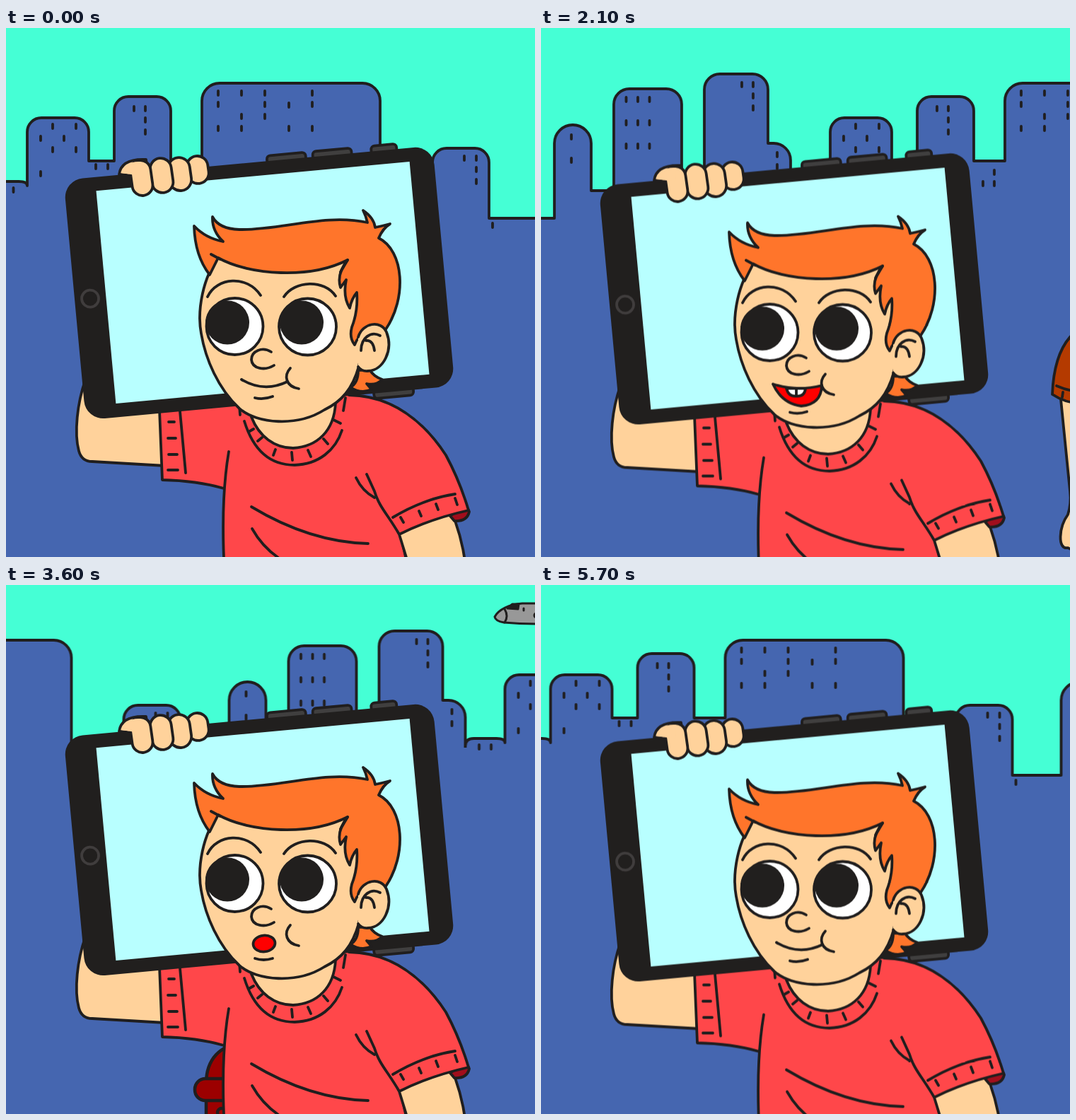
Animation, 748 px wide and 748 px high, one loop 5.8 s. Source, as an HTML page without scripts:

```html
<!DOCTYPE html>
<html lang="en">
<head>
<meta charset="utf-8">
<title>City walk</title>
<style>
html, body { margin: 0; width: 100%; height: 100%; overflow: hidden; background: #45ffd5; }
svg { display: block; width: 100vw; height: 100vh; }
path, rect, circle, ellipse { stroke: #201e1e; stroke-width: 3.8; stroke-linejoin: round; stroke-linecap: round; }
.line { fill: none; }
.flat { stroke: none; }
.ink { fill: #211f1e; }
.skin { fill: #ffd29b; }
.blue { fill: #4566b0; }
.red { fill: #ff474a; }
.hair { fill: #ff752b; }
.key { fill: #403f3f; }
.rust { fill: #b43a00; }
.pants { fill: #7d2a00; }
.blond { fill: #ffb500; }
.iron rect, .iron path, .iron circle { fill: #9c0000; stroke-width: 4.5; }
.plane > * { stroke-width: 3; }
.grey { fill: #989898; }
.white { fill: #fff; }
.lips { fill: #f00; }

.loop { animation: 5.8s steps(58, end) -10ms infinite; }
.city { animation-name: city; }
.walker { animation-name: walker; }
.iron { animation-name: iron; }
.plane { animation-name: plane; }
.hero { animation: bob .2s step-end -10ms infinite; }
.mouth { animation: 5.8s step-end -10ms infinite; }
.smile { animation-name: smile; }
.grin { animation-name: grin; }
.ooh { animation-name: ooh; }

@keyframes city {
  0% { transform: translateX(0); animation-timing-function: steps(7, end); }
  12.069% { transform: translateX(127px); animation-timing-function: steps(8, end); }
  25.862% { transform: translateX(270.5px); animation-timing-function: steps(7, end); }
  37.931% { transform: translateX(397px); animation-timing-function: steps(4, end); }
  44.828% { transform: translateX(475.5px); animation-timing-function: steps(10, end); }
  62.069% { transform: translateX(675.5px); animation-timing-function: steps(8, end); }
  75.862% { transform: translateX(835.5px); animation-timing-function: steps(13, end); }
  98.276% { transform: translateX(1095.5px); animation-timing-function: steps(1, end); }
  100% { transform: translateX(1112px); }
}
@keyframes walker { from { transform: translateX(-350px); } to { transform: translateX(2550px); } }
@keyframes iron { from { transform: translateX(-2200px); } to { transform: translateX(700px); } }
@keyframes plane { from { transform: translateX(2640px); } to { transform: translateX(-840px); } }
@keyframes bob { 0% { transform: translateY(0); } 50% { transform: translateY(8.5px); } }
@keyframes smile {
  0%, 39.655% { visibility: visible; }
  20.69%, 55.172% { visibility: hidden; }
  84.483%, 100% { visibility: visible; }
}
@keyframes grin { 0%, 39.655%, 100% { visibility: hidden; } 20.69% { visibility: visible; } }
@keyframes ooh { 0%, 84.483%, 100% { visibility: hidden; } 55.172% { visibility: visible; } }
</style>
</head>
<body>
<svg viewBox="0 0 748 748">
<defs>
  <g id="block">
    <path class="blue" d="M-26 900V228Q-26 217-14 217H18Q30 217 30 223V147a20 20 0 0 1 20-20H97a20 20 0 0 1 20 20V188H153V117a20 20 0 0 1 20-20H213a20 20 0 0 1 20 20V188H277V103a25 25 0 0 1 25-25H504a25 25 0 0 1 25 25V269H603V190a20 20 0 0 1 20-20H663a20 20 0 0 1 20 20V269H752V163a26 26 0 0 1 52 0V230H836V108a22 22 0 0 1 22-22H910a22 22 0 0 1 22 22V208H954Q964 208 964 216V87a22 22 0 0 1 22-22H1032a22 22 0 0 1 22 22V163h8a24 24 0 0 1 24 24V900z"/>
    <rect class="blue flat" x="-31" y="230" width="10" height="600"/>
    <g class="line" transform="translate(0 -3)">
      <path d="M-6.500 229v6M10.500 229v6M66 139v6M99 139v6M49 156v6M82 156v6M66 172v6M99 172v6M49 206v6M127 196v6M144 196v6"/>
      <path d="M181 114v6M197 114v6M197 130v6M197 147v6M262 204v6M246 220v6M262 220v6"/>
      <path d="M300 92v6M333 92v6M366 92v6M433 92v6M300 108v6M366 108v6M400 109v6M433 108v6M333 125v6M366 125v6M300 142v6M333 142v6M400 142v6M433 142v6"/>
      <path d="M535 279v6M552 279v6M569 279v6M648 184v6M665 184v6M665 200v6M665 217v6M688 279v6"/>
      <path d="M776 154v6M776 187v6M939 225v6M939 258v6"/>
      <path id="trio" d="M853.500 101v6M870 101v6M886.500 101v6"/>
      <use href="#trio" y="33"/>
      <use href="#trio" y="66"/>
      <path d="M1017 80v6M1033 80v6M1033 96v6M1033 113v6M1067 179v6M1067 196v6"/>
    </g>
  </g>
</defs>

<rect class="flat" width="748" height="748" fill="#45ffd5"/>
<g class="loop city">
  <use href="#block" x="-1112"/>
  <use href="#block"/>
</g>

<g class="loop plane">
  <path class="grey" d="M361 28Q378 22 389 10Q393 4 416 4L393 32z"/>
  <path class="grey" d="M211 45C216 35 232 27 250 26H362Q392 25 411 26Q404 36 372 43C330 55 270 57 224 53Q212 51 211 45z"/>
  <path class="line" d="M225 34Q231 44 225 53"/>
  <path class="ink" d="M229 33L236 27H245L244 34z"/>
  <path class="line" d="M252 33v3M276 31v4M284 31v4M292 31v4M300 31v4M308 31v4M316 31v4M324 31v4M332 31v4M340 31v4"/>
  <rect class="white" x="362" y="31" width="21" height="4" rx="2"/>
  <path class="grey" d="M276 47h22v8h12v5h-15l-2 2h-16z"/>
  <path class="line" d="M285 49v13M293 49v11"/>
  <rect class="white" x="267" y="40" width="55" height="6" rx="3"/>
</g>

<g class="loop walker">
  <path class="skin" d="M128 515L174 572Q193 574 192 546L185 446Q184 426 168 426Q153 428 155 446L160 515z"/>
  <path class="skin" d="M75 730V790H136V730zM153 730V790H205V730z"/>
  <path class="skin" d="M98 360V425H150V390z"/>
  <path class="skin" d="M94 330C94 285 185 275 187 345C190 400 130 420 100 392z"/>
  <path class="blond" d="M182 310C170 265 100 255 88 288C76 305 87 325 79 346Q72 352 64 350Q67 357 74 359Q72 370 67 377Q81 388 93 381L104 350Q115 325 182 310z"/>
  <path class="skin" d="M103 363Q88 357 87 370Q88 384 102 384"/>
  <path class="line" d="M92 372Q95 365 101 368M92 392l8 4M95 401l7 2"/>
  <path class="pants" d="M80 640L76 733Q110 739 137 732L146 683L152 731Q182 738 213 732L211 640z"/>
  <path class="line" d="M78 720Q110 726 138 720M152 718Q182 724 212 719M146 650V683M120 684q14 2 24-3M148 682q16 2 36 8M153 679q12-7 22-8M96 650q-2 14-13 18M196 650q3 13 14 17"/>
  <path class="rust" d="M104 412C84 425 88 520 82 642Q150 652 212 646Q206 605 170 572Q145 520 150 420z"/>
  <path class="line" d="M87 629Q150 636 208 630"/>
  <path class="skin" d="M35 525L48 655Q50 672 45 688C32 706 30 738 45 735Q54 741 64 735Q75 743 83 733Q102 737 102 719Q107 710 100 703Q108 684 91 680L83 681L80 525z"/>
  <path class="line" d="M83 681Q72 685 74 697Q82 706 100 703M64 735q-4-8 2-15M84 733q-6-6-1-14q9-4 16 1"/>
  <path class="rust flat" d="M104 412C60 415 26 440 23 518Q50 536 82 529L100 465z"/>
  <path class="line" d="M104 412C60 415 26 440 23 518Q50 536 82 529L90 490L92 467M98 465L96 495M29 506Q56 518 87 513M38 515l-1 7M50 518v7M62 520v7M76 518v7"/>
</g>

<g class="loop iron">
  <rect x="719" y="628" width="25" height="32"/>
  <path class="line" d="M727 632v20M736 632v20"/>
  <path d="M683 705C683 670 704 650 731 650S779 670 779 705z"/>
  <rect x="683" y="715" width="96" height="60"/>
  <rect x="667" y="698" width="128" height="31" rx="15"/>
  <circle cx="705" cy="746" r="6"/>
  <circle cx="731" cy="746" r="6"/>
  <circle cx="757" cy="746" r="6"/>
</g>

<g class="hero">
  <path class="skin" d="M112 498C101 530 96 572 103 598Q107 613 122 613L225 619V530z"/>
  <path class="skin" d="M550 705L568 760H650Q644 715 628 680z"/>
  <path d="M628 690Q652 672 655 684Q652 698 634 697z" fill="#a10e1c"/>
  <path class="red flat" d="M216 535L221 639Q270 640 308 651Q306 690 309 770H568L556 716Q600 694 654 682C646 655 636 630 622 604C590 555 545 520 485 519L330 525z"/>
  <path class="line" d="M217 540L221 639Q270 640 308 651M315 599C308 640 305 700 309 770M485 519C545 520 590 555 622 604C636 630 646 655 654 682Q600 694 556 716L568 755M556 716C540 688 528 678 521 655L510 631M495 636Q504 655 521 664"/>
  <path class="line" d="M246 542L254 629M230 557h8M229 580h11M230 603h12M229 625h14M547 692Q590 666 635 659M558 692l4 7M584 683l3 7M608 673l3 8M635 665l3 9"/>
  <path class="line" d="M347 677Q430 727 512 729M348 708Q362 733 385 749"/>
  <path class="skin" d="M347 550C358 578 380 594 406 594C440 592 464 570 466 530L440 510H360z"/>
  <path class="line" d="M337 556C349 595 372 618 408 618C442 617 466 597 475 569M330 534L331 547M480 523L477 541M343 571l7-4M356 584l6-5M378 604l3-8M405 611l-1-11M431 606l-4-9M455 588l-6-7M473 559l-10-5"/>

  <g transform="translate(363 360) rotate(-5.300)">
    <rect class="key" x="22" y="-178" width="55" height="14" rx="5"/>
    <rect class="key" x="87" y="-178" width="55" height="14" rx="5"/>
    <rect class="key" x="170" y="-178" width="36" height="14" rx="5"/>
    <rect class="key" x="142" y="164" width="56" height="14" rx="5"/>
    <rect class="ink flat" x="-267" y="-170.500" width="524" height="341" rx="27"/>
    <rect class="flat" x="-222.500" y="-151" width="445" height="302" fill="#b8ffff"/>
    <circle class="line" cx="-245" r="12" style="stroke: #403d3d"/>
  </g>

  <path class="skin" d="M160 207C162 191 176 185 198 186L202 212L180 209z"/>
  <rect class="skin" x="256" y="181" width="30" height="39" rx="15" transform="rotate(-8 271 200)"/>
  <rect class="skin" x="230" y="183" width="31" height="47" rx="15.500" transform="rotate(-8 246 206)"/>
  <rect class="skin" x="205" y="184" width="30" height="49" rx="15" transform="rotate(-8 220 208)"/>
  <rect class="skin" x="177" y="187" width="29" height="50" rx="14.500" transform="rotate(-8 192 212)"/>
  <path class="skin flat" d="M163 205C165 195 176 188 190 189L191 207L180 207.500z"/>

  <path class="hair" d="M498 484Q498 502 487 508Q502 518 517 511L510 503Q523 506 532 497Q520 493 514 483z"/>
  <path class="skin" d="M302 322C278 352 270 400 276 432C282 468 300 510 330 538C355 560 412 564 450 540C475 528 490 510 499 478L510 420L480 310z"/>
  <path class="hair" d="M266 280Q282 297 307 302Q291 287 292 267Q301 284 330 285C390 286 450 262 511 275Q509 266 505 258Q520 268 522 282Q532 280 543 277Q533 283 527 297C563 315 567 382 537 426L510 428Q497 436 493 448Q485 438 489 423Q498 400 496 374Q489 382 486 396Q476 380 481 356L473 367Q467 348 483 328C430 355 345 350 300 325L288 349Q267 322 266 280z"/>
  <path class="line" d="M290 320L303 327M483 328L473 345"/>
  <path class="skin" d="M498 437C504 417 530 412 538 430C548 455 534 484 512 485Q503 486 498 479"/>
  <path class="line" d="M502 456C502 438 516 428 529 435M509 442Q519 441 521 456"/>

  <path class="line" d="M285 380C298 352 341 349 360 378M393 380C408 357 450 355 466 379"/>
  <ellipse class="white" cx="323.500" cy="422" rx="40" ry="40"/>
  <circle class="ink flat" cx="313" cy="416.500" r="31"/>
  <ellipse class="white" cx="426.500" cy="422.500" rx="40.500" ry="40"/>
  <circle class="ink flat" cx="418" cy="416.500" r="31"/>
  <path class="line" d="M375 458C362 450 347 457 347 469C348 482 366 485 379 477M402 481C392 492 396 507 414 510"/>

  <g class="mouth smile">
    <path class="line" d="M333 497Q365 516 398 500M352 523Q364 526 377 521"/>
  </g>
  <g class="mouth grin">
    <path class="lips" d="M328 495Q362 506 397 497Q396 524 368 526Q341 523 328 495z"/>
    <path class="white" d="M347 501Q350 513 361 512Q373 513 374 501zM361 502V512"/>
    <path class="line" d="M352 535Q364 538 376 534"/>
  </g>
  <g class="mouth ooh">
    <ellipse class="lips" cx="365" cy="507" rx="15.500" ry="11.500" transform="rotate(-5 365 507)"/>
    <path class="line" d="M352 528Q364 532 377 528"/>
  </g>
</g>
</svg>
</body>
</html>
```
